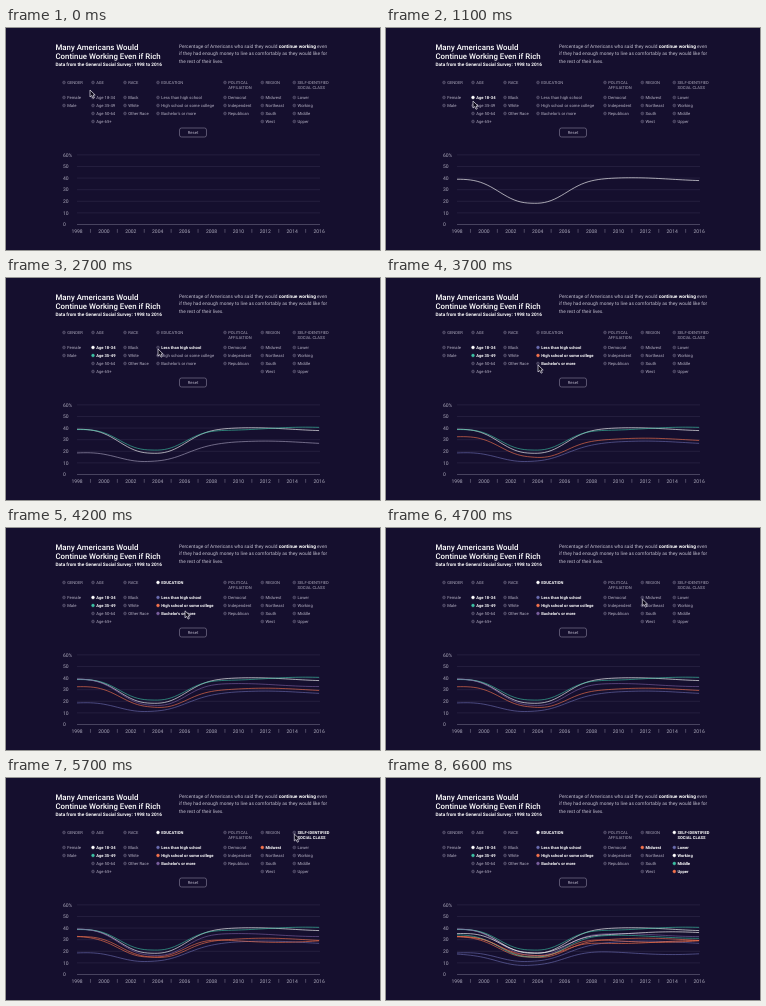
Animation, 374 px wide and 222 px high, one loop 7200 ms. Source, as an HTML page:

```html
<!DOCTYPE html>
<html lang="en">
<head>
<meta charset="utf-8">
<title>Continue working survey</title>
<style>
html, body { margin: 0; width: 100%; height: 100%; overflow: hidden; background: #150f2e; }
svg { display: block; width: 100%; height: 100%; }
text { font-family: Roboto, sans-serif; text-rendering: geometricPrecision; }
.title { font-size: 7.85px; font-weight: 500; fill: #fff; }
.sub { font-size: 4.7px; font-weight: 700; fill: #fff; }
.intro { font-size: 4.8px; fill: #c3c0d0; }
.intro tspan { font-weight: 700; fill: #fff; }
.head { font-size: 4.1px; fill: #aaa6ba; }
.item { font-size: 4.2px; fill: #b4b0c3; }
.on { font-weight: 700; fill: #fff; }
.item.on { font-size: 4.1px; }
.axis { font-size: 5px; fill: #aaa7b9; }
.line { fill: none; stroke-width: .9; stroke-linejoin: round; }
</style>
</head>
<body>
<svg id="stage" viewBox="0 0 374 222"></svg>
<script>
const LOOP = 7200, STEP = 100;
const WHITE = '#ffffff', TEAL = '#3cbfa2', SLATE = '#6a6cae', ORANGE = '#f4734d', PURPLE = '#7a5f9e';
const stage = document.getElementById('stage');

function add(tag, attrs, text, parent = stage) {
  const el = document.createElementNS('http://www.w3.org/2000/svg', tag);
  for (const k in attrs) el.setAttribute(k, attrs[k]);
  if (text) el.textContent = text;
  return parent.appendChild(el);
}
const label = (x, y, cls, text, extra) => add('text', { x, y, class: cls, ...extra }, text);

add('rect', { width: 374, height: 222, fill: '#150f2e' });
label(49.5, 21.8, 'title', 'Many Americans Would');
label(49.5, 31.4, 'title', 'Continue Working Even if Rich');
label(49.5, 37.8, 'sub', 'Data from the General Social Survey: 1998 to 2016');
const intro = label(173, 19.7, 'intro', 'Percentage of Americans who said they would ');
add('tspan', {}, 'continue working', intro);
intro.append(' even');
label(173, 27.1, 'intro', 'if they had enough money to live as comfortably as they would like for');
label(173, 34.5, 'intro', 'the rest of their lives.');

add('rect', { x: 173.5, y: 100, width: 27, height: 9, rx: 2, fill: 'none', stroke: '#77728c', 'stroke-width': .7 });
label(187, 106.1, 'item', 'Reset', { 'text-anchor': 'middle' });

// Axes
const yearX = i => 71 + i * 26.9;
const valueY = v => 196.5 - v * 1.16;
for (let v = 0; v <= 60; v += 10) {
  const y = valueY(v);
  add('line', { x1: 71, x2: 314, y1: y, y2: y, stroke: v ? '#2b2545' : '#5f5a75', 'stroke-width': .7 });
  label(57, y + 1.7, 'axis', v === 60 ? '60%' : String(v));
}
for (let i = 0; i < 10; i++) {
  label(yearX(i), 204.8, 'axis', String(1998 + 2 * i), { 'text-anchor': 'middle' });
  const x = yearX(i + .5);
  if (i < 9) add('line', { x1: x, x2: x, y1: 201, y2: 204.8, stroke: '#8a869c', 'stroke-width': .5 });
}

const clamp = u => Math.max(0, Math.min(1, u));
const ease = u => u * u * (3 - 2 * u);

// Every series halves around 2004, settles at a new level and ripples a little
function percent(i, { from, to, peak }) {
  const level = from + (to - from) * ease(clamp((i - 1) / 5));
  const dip = from / 2 * Math.exp(-(Math.abs((i - 2.8) / 1.5) ** 2.6));
  return level - dip + 1.3 * Math.cos((i - peak) * Math.PI / 3);
}
function curve(s) {
  const points = [];
  for (let i = 0; i <= 9; i += .125) points.push(`${yearX(i)},${valueY(percent(i, s)).toFixed(2)}`);
  return 'M' + points.join('L');
}

const series = {
  'Age 18-34': { color: WHITE, from: 38, to: 39, peak: 6.5 },
  'Age 35-49': { color: TEAL, from: 40, to: 39.5, peak: 8.5 },
  'Less than high school': { color: SLATE, from: 18, to: 27.5, peak: 7 },
  'High school or some college': { color: ORANGE, from: 32, to: 30, peak: 7 },
  "Bachelor's or more": { color: PURPLE, from: 38, to: 34, peak: 6 },
  'Midwest': { color: ORANGE, from: 33, to: 29, peak: 4.5 },
  'Lower': { color: SLATE, from: 17, to: 18.5, peak: 5 },
  'Working': { color: WHITE, from: 36, to: 35.5, peak: 8 },
  'Middle': { color: TEAL, from: 33, to: 32.5, peak: 6 },
  'Upper': { color: ORANGE, from: 34, to: 28, peak: 9 }
};

const CLASS = 'SELF-IDENTIFIED|SOCIAL CLASS';
const groups = [
  [58, 'GENDER', 'Female', 'Male'],
  [87, 'AGE', 'Age 18-34', 'Age 35-49', 'Age 50-64', 'Age 65+'],
  [119, 'RACE', 'Black', 'White', 'Other Race'],
  [152, 'EDUCATION', 'Less than high school', 'High school or some college', "Bachelor's or more"],
  [219, 'POLITICAL|AFFILIATION', 'Democrat', 'Independent', 'Republican'],
  [256.3, 'REGION', 'Midwest', 'Northeast', 'South', 'West'],
  [288.3, CLASS, 'Lower', 'Working', 'Middle', 'Upper']
];

// The pointer reaches an entry, its line shows, then a click colours it
const LINE_DELAY = 200, CLICK_DELAY = 400;
const visits = {
  'Age 18-34': 600, 'Age 35-49': 1300, 'Less than high school': 2400,
  'High school or some college': 3000, "Bachelor's or more": 3600,
  'Midwest': 4900, [CLASS]: 5700
};
// Entries switched along with another one
const linked = { 'EDUCATION': "Bachelor's or more" };
for (const name of groups.at(-1).slice(2)) linked[name] = CLASS;
const reached = name => visits[name] ?? visits[linked[name]] ?? Infinity;

const lines = Object.entries(series).map(([name, s]) =>
  ({ el: add('path', { d: curve(s), class: 'line' }), time: reached(name), color: s.color }));

const entries = groups.flatMap(([x, ...names]) => names.map((name, i) => {
  const y = i ? 61.5 + 8 * i : 54.5;
  const cls = i ? 'item' : 'head';
  const click = reached(name) + CLICK_DELAY;
  return {
    name, x, y, cls, click,
    bold: visits[name] ?? click,
    color: series[name]?.color || WHITE,
    dot: add('circle', { cx: x, cy: y, r: 1.4, 'stroke-width': .5 }),
    texts: name.split('|').map((s, k) => label(x + 3.2, y + 1.5 + 4.7 * k, cls, s))
  };
}));

const cursor = add('path', {
  d: 'M0 0V7L1.7 5.5L3 8.2L4.3 7.6L3.1 5H5.2Z',
  fill: '#0b0818', stroke: '#e8e6ef', 'stroke-width': .7, 'stroke-linejoin': 'round'
});

const EXIT = 6300, GONE = 6600;
const stops = [{ x: 84, y: 62, leave: 0 }];
for (const name in visits) {
  const { x, y, click } = entries.find(e => e.name === name);
  stops.push({ x, y: y + 1.5, arrive: visits[name], leave: click });
}
stops.at(-1).leave = EXIT;
stops.push({ x: 328, y: 14, arrive: GONE, leave: LOOP });

function pointer(t) {
  const i = stops.findLastIndex(s => s.leave <= t);
  const a = stops[i], b = stops[i + 1];
  const span = Math.min(600, b.arrive - a.leave);
  const u = ease(clamp((t - a.leave) / span));
  return [a.x + (b.x - a.x) * u, a.y + (b.y - a.y) * u];
}

function draw(t) {
  for (const { el, time, color } of lines) {
    el.setAttribute('stroke', t >= time + CLICK_DELAY ? color : '#a6a0bd');
    el.setAttribute('stroke-opacity', t >= time + LINE_DELAY ? .7 : 0);
  }
  for (const { dot, texts, cls, bold, click, color } of entries) {
    const picked = t >= click;
    dot.setAttribute('fill', picked ? color : '#3b3554');
    dot.setAttribute('stroke', picked ? color : '#68627d');
    for (const el of texts) el.setAttribute('class', t >= bold ? cls + ' on' : cls);
  }
  cursor.setAttribute('transform', `translate(${pointer(t)})`);
  cursor.setAttribute('visibility', t < GONE ? 'visible' : 'hidden');
}

const start = performance.now();
function tick() {
  const t = (performance.now() - start) % LOOP;
  draw(Math.floor(t / STEP) * STEP);
  requestAnimationFrame(tick);
}
tick();
</script>
</body>
</html>
```
